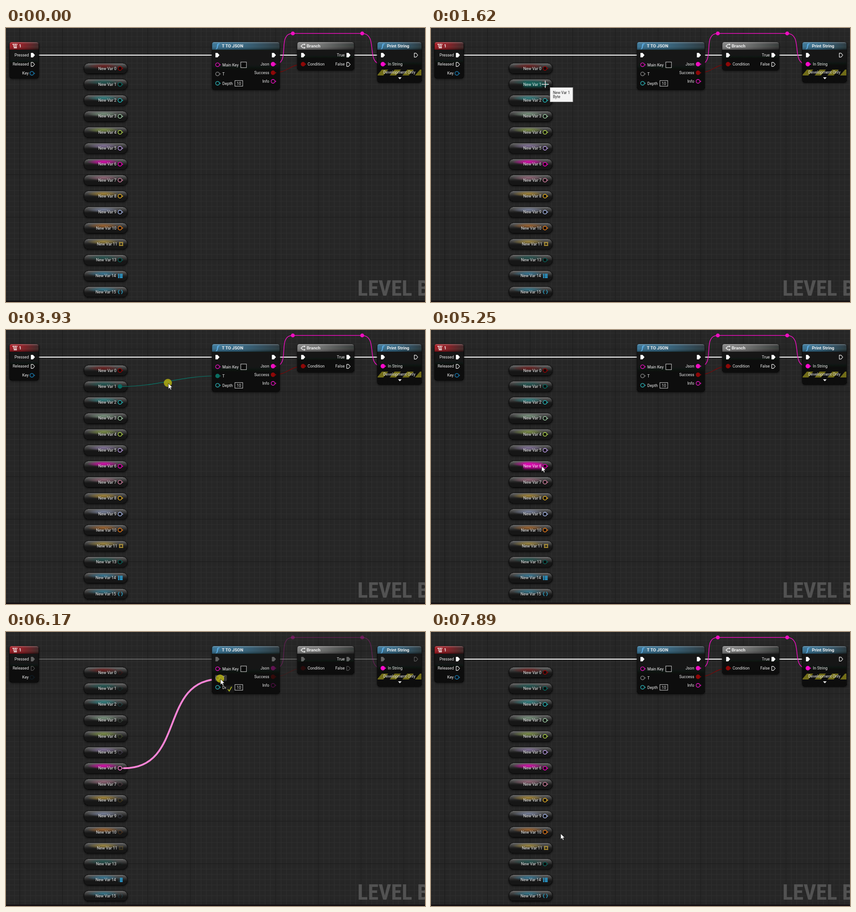
Write an HTML page that moves like this. It is 924 px wide and 606 px high and loops after 7990 ms.

```html
<!DOCTYPE html>
<html lang="en">
<head>
<meta charset="utf-8">
<title>Node graph</title>
<style>
html, body { margin: 0; width: 100%; height: 100%; overflow: hidden; background: #262626; }
svg { display: block; width: 100vw; height: 100vh; }
text { font: 8.8px Roboto, "Noto Sans", sans-serif; fill: #eee; white-space: pre; }
.title { font-weight: 700; font-size: 9.6px; }
.fn { font: italic 700 13px "Noto Serif", serif; fill: #62b4ee; }
.mark { font: 700 48px "Roboto Condensed", Roboto, sans-serif; font-stretch: 75%; fill: #525252; }
.tip { font-size: 8.2px; fill: #222; }
</style>
</head>
<body>
<svg id="stage" viewBox="0 0 924 606" preserveAspectRatio="none">
  <defs>
    <pattern id="minor" x="30" y="41.7" width="11.757" height="11.757" patternUnits="userSpaceOnUse">
      <path d="M.5 0V11.757M0 .5H11.757" stroke="#303030" stroke-width=".9"/>
    </pattern>
    <pattern id="major" x="30" y="41.7" width="94.056" height="94.056" patternUnits="userSpaceOnUse">
      <path d="M.5 0V94.056M0 .5H94.056" stroke="#191919"/>
    </pattern>
    <pattern id="stripes" width="28" height="13" x="818" y="92" patternUnits="userSpaceOnUse">
      <path d="M0 13L11 0H25L14 13Z" fill="#716c18"/>
    </pattern>
    <linearGradient id="body" x2="0" y2="1">
      <stop stop-color="#1b1d1c" stop-opacity=".95"/><stop offset="1" stop-color="#0a0a0a" stop-opacity=".95"/>
    </linearGradient>
    <linearGradient id="gloss" x2="0" y2="1">
      <stop stop-color="#fff" stop-opacity=".22"/><stop offset=".35" stop-color="#fff" stop-opacity=".05"/>
      <stop offset="1" stop-color="#000" stop-opacity=".3"/>
    </linearGradient>
    <linearGradient id="pill" x2="0" y2="1">
      <stop stop-color="#777"/><stop offset=".13" stop-color="#555"/>
      <stop offset=".42" stop-color="#2c2c2c"/><stop offset=".55" stop-color="#1a1a1a"/><stop offset="1" stop-color="#141414"/>
    </linearGradient>
    <filter id="shadow" x="-20%" y="-30%" width="140%" height="170%">
      <feDropShadow dx="0" dy="1.5" stdDeviation="2" flood-opacity=".75"/>
    </filter>
    <filter id="soft" x="-30%" y="-60%" width="160%" height="220%"><feGaussianBlur stdDeviation="2"/></filter>
  </defs>
  <rect width="924" height="606" fill="#262626"/>
  <rect width="924" height="606" fill="url(#minor)"/>
  <rect width="924" height="606" fill="url(#major)"/>
  <text class="mark" x="775" y="592">LEVEL B</text>
  <rect y="603" width="924" height="3" fill="#140f12"/>
</svg>
<script>
const LOOP = 7990;
const stage = document.getElementById('stage');
const defs = stage.querySelector('defs');

function el(parent, tag, attrs = {}, text) {
  const node = document.createElementNS('http://www.w3.org/2000/svg', tag);
  for (const key in attrs) node.setAttribute(key, attrs[key]);
  if (text !== undefined) node.textContent = text;
  parent.append(node);
  return node;
}
const group = (parent, attrs) => el(parent, 'g', attrs);
const label = (parent, x, y, text, anchor = 'start', cls = '') =>
  el(parent, 'text', { x, y, 'text-anchor': anchor, class: cls }, text);
const show = (node, on) => node.setAttribute('opacity', +on);

const varLayer = group(stage), wireLayer = group(stage), nodeLayer = group(stage), topLayer = group(stage);

// parts that fade while a wire is dragged: [element, faded opacity]
const fading = [];
function dims(node, low) { fading.push([node, low]); return node; }

function pin(parent, x, y, color, filled) {
  const g = group(parent, { transform: `translate(${x} ${y})` });
  g.ring = el(g, 'circle', { r: 4.1, stroke: color, 'stroke-width': 1.6, fill: filled ? color : '#0b0b0b' });
  g.tip = el(g, 'path', { d: 'M5.2 -1.9L7.3 0L5.2 1.9Z', fill: color });
  return g;
}
function paintPin(p, color, filled) {
  p.ring.setAttribute('stroke', color);
  p.ring.setAttribute('fill', filled ? color : '#0b0b0b');
  p.tip.setAttribute('fill', color);
}
function exec(parent, x, y, filled) {
  dims(el(parent, 'path', {
    d: `M${x - 3.6} ${y - 4.4}h3.8l4 4.4l-4 4.4h-3.8z`, fill: filled ? '#fff' : 'none',
    stroke: '#fff', 'stroke-width': 1.1, 'stroke-linejoin': 'round'
  }), .33);
}

// horizontal tangents that grow with both distances
function curve(x0, y0, x1, y1) {
  const c = (Math.abs(x1 - x0) + Math.abs(y1 - y0)) / 3;
  return `M${x0} ${y0}C${x0 + c} ${y0} ${x1 - c} ${y1} ${x1} ${y1}`;
}
const wire = (d, stroke, width) =>
  el(wireLayer, 'path', { d, stroke, 'stroke-width': width, fill: 'none', 'stroke-linecap': 'round' });

// variables
const vars = [
  [0, '#8e0505'], [1, '#0a6a62'], [2, '#25b3b5'], [3, '#a4d2ab'], [4, '#a9cc4b'],
  [5, '#b496dc'], [6, '#f500c0'], [7, '#cf7f9f'], [8, '#efb82a'], [9, '#a3b3e2'],
  [10, '#e27a1c'], [11, '#e5bd3c'], [13, '#0a5f57'], [14, '#2c9fd3'], [15, '#2a9fc4']
];
const pinAt = {}, glow = {};
vars.forEach(([n, color], i) => {
  const y = 89.5 + i * 35.3;
  const g = group(varLayer, { transform: `translate(0 ${y.toFixed(1)})` });
  const grad = el(defs, 'radialGradient', { id: 'tint' + n });
  const tint = n === 6 ? .85 : .55;
  [[0, tint], [.5, tint * .55], [1, 0]].forEach(([offset, o]) =>
    el(grad, 'stop', { offset, 'stop-color': color, 'stop-opacity': o }));
  el(g, 'rect', { x: 172, y: -11.5, width: 95.5, height: 23, rx: 9.5, fill: 'url(#pill)', stroke: '#090909', filter: 'url(#shadow)' });
  el(g, 'path', { d: 'M181 -10.6H258', stroke: '#b5b5b5', 'stroke-width': .8, opacity: .4 });
  el(g, 'ellipse', { cx: 215, cy: -5, rx: 36, ry: 6.2, fill: `url(#tint${n})` });
  glow[n] = el(g, 'rect', { x: 204, y: -6, width: 42, height: 12, fill: color, filter: 'url(#soft)', opacity: 0 });
  const icon = n === 11 || n > 13;
  label(g, icon ? (n === 11 ? 245.5 : 242.5) : 243.5, 3, 'New Var ' + n, 'end');
  if (n === 11) {
    const cells = dims(group(g, { fill: color }), .25);
    for (let k = 0; k < 9; k++)
      if (k !== 4) el(cells, 'rect', { x: 249.5 + k % 3 * 3.2, y: -4.5 + (k / 3 | 0) * 3.2, width: 2.3, height: 2.3 });
  } else if (n === 14) {
    const keys = dims(group(g, { fill: color }), .15);
    for (let k = 0; k < 3; k++) {
      el(keys, 'rect', { x: 247, y: -4.8 + k * 3.4, width: 3, height: 2.7 });
      el(g, 'rect', { x: 251, y: -4.8 + k * 3.4, width: 6.3, height: 2.7, fill: color });
    }
  } else if (n === 15) {
    dims(el(g, 'path', {
      d: 'M250.5 -4h-1q-1 0 -1 1.2v1.6l-1.4 1.2l1.4 1.2v1.6q0 1.2 1 1.2h1M253.8 -4h1q1 0 1 1.2v1.6l1.4 1.2l-1.4 1.2v1.6q0 1.2 -1 1.2h-1',
      fill: 'none', stroke: color, 'stroke-width': 1.3
    }), .2);
  } else {
    pinAt[n] = pin(g, 251.3, 0, color);
    pinAt[n].color = color;
    if (n !== 1 && n !== 6) dims(pinAt[n], n === 13 ? .08 : .2);
  }
});

// fixed wires
[[64, 466], [596, 655], [760, 831]].forEach(([a, b]) => dims(wire(`M${a} 60H${b}`, '#fff', 2.2), .28));
const pink = '#ee0fc0';
dims(wire(curve(593, 80, 632, 12) + 'H785' + curve(785, 12, 829, 80).replace('M', 'L'), pink, 1.5), .27);
dims(wire(curve(592, 99, 655, 80), '#780707', 1.4), .3);
for (const cx of [632.5, 785.5]) dims(el(wireLayer, 'circle', { cx, cy: 12, r: 4.3, fill: pink }), .3);
const dragWire = wire('', '#fff', 4);
const linkWire = wire('', '#fff', 1.4);

// function nodes
function box(x, w, h, color, title, titleX) {
  const g = group(nodeLayer), id = 'head' + x, d = `M${x} 48V36q0 -5 5 -5h${w - 10}q5 0 5 5v12z`;
  const grad = el(defs, 'linearGradient', { id });
  [[0, .95], [.4, .8], [1, .18]].forEach(([offset, o]) => el(grad, 'stop', { offset, 'stop-color': color, 'stop-opacity': o }));
  el(g, 'rect', { x, y: 31, width: w, height: h, rx: 5, fill: 'url(#body)', stroke: '#070707', filter: 'url(#shadow)' });
  el(g, 'path', { d, fill: `url(#${id})` });
  el(g, 'path', { d, fill: 'url(#gloss)' });
  el(g, 'path', { d: `M${x + 4} 31.5h${w - 8}`, stroke: '#ccc', 'stroke-width': .8, opacity: .3 });
  label(g, titleX, 43, title, 'start', 'title');
  return g;
}
const blue = '#317297';

const keyNode = box(8, 64, 80, '#a50f18', '1', 28.5);
[[14.5, 35, 3.2], [18.7, 35, 3.2], [22.9, 35, 2], [16.2, 38.6, 3.2], [20.4, 38.6, 3.2], [17, 42.2, 7]].forEach(([x, y, width]) =>
  el(keyNode, 'rect', { x, y, width, height: 2.5, fill: '#f2e8e8' }));
label(keyNode, 50.5, 63, 'Pressed', 'end');
label(keyNode, 50.5, 83.3, 'Released', 'end');
label(keyNode, 50, 103.3, 'Key', 'end');
exec(keyNode, 59, 60, true);
exec(keyNode, 59, 80.5, false);
dims(pin(keyNode, 57, 100.3, '#1b76a8'), .15);

const json = box(454.5, 149, 105, blue, 'T TO JSON', 476);
label(json, 464, 44, 'f', 'start', 'fn');
exec(json, 466, 60, true);
exec(json, 590.5, 60, true);
pin(json, 466.5, 81.3, '#d513b2');
const hoverT = el(json, 'rect', { x: 461, y: 95, width: 26, height: 13.5, rx: 2, fill: '#363636', opacity: 0 });
const pinT = pin(json, 466.5, 101.6, '#7c7c7c');
pin(json, 466.5, 122.3, '#2ba3a8');
label(json, 477, 84.5, 'Main Key');
label(json, 477, 104.8, 'T');
label(json, 477, 125.5, 'Depth');
el(json, 'rect', { x: 517.8, y: 75.3, width: 12.4, height: 12.4, fill: '#080808', stroke: '#ddd' });
el(json, 'rect', { x: 504.8, y: 116.3, width: 17.2, height: 12.4, fill: '#080808', stroke: '#ddd' });
label(json, 513.4, 125.7, '10', 'middle');
label(json, 580.5, 83, 'Json', 'end');
label(json, 580.5, 102.2, 'Success', 'end');
label(json, 580.5, 121.2, 'Info', 'end');
dims(pin(json, 588.8, 80, pink, true), .35);
dims(pin(json, 588.8, 99, '#8e0808', true), .3);
dims(pin(json, 588.8, 118, '#d513b2'), .3);

const branch = box(642.5, 125, 62, '#808080', 'Branch', 663);
el(branch, 'path', {
  d: 'M658.5 36.2H656q-3.8 0 -3.8 3.8t3.8 3.8h2.5M649.5 40h2.6', stroke: '#eee', 'stroke-width': 1.4, fill: 'none'
});
el(branch, 'path', { d: 'M657.5 34l3 2.2l-3 2.2zM657.5 41.6l3 2.2l-3 2.2z', fill: '#eee' });
exec(branch, 655, 60, true);
exec(branch, 755, 60, true);
exec(branch, 755, 80.5, false);
dims(pin(branch, 655, 80, '#8e0808', true), .22);
label(branch, 665, 83, 'Condition');
label(branch, 747, 63, 'True', 'end');
label(branch, 747, 83.3, 'False', 'end');

const print = box(819, 97.5, 89, blue, 'Print String', 840);
label(print, 828, 44, 'f', 'start', 'fn');
exec(print, 831, 60, true);
exec(print, 904, 60, false);
pin(print, 831, 80, '#fa0acb', true);
label(print, 842, 83, 'In String');
el(print, 'rect', { x: 819.5, y: 92, width: 96.5, height: 13, fill: 'url(#stripes)' });
label(print, 867.5, 101.3, 'Development Only', 'middle');
el(print, 'path', { d: 'M864.5 109h8l-4 4.6z', fill: '#e5e5e5' });

// pointer and hints
const tooltip = group(topLayer);
el(tooltip, 'rect', { x: 262.5, y: 131.5, width: 50.5, height: 32, fill: '#f4f4f4', stroke: '#777' });
label(tooltip, 269, 145.6, 'New Var 1', 'start', 'tip');
label(tooltip, 269, 155.3, 'Byte', 'start', 'tip');

const pointer = group(topLayer);
const press = el(pointer, 'circle', { cx: -1, cy: -1, r: 9, fill: '#bdb80f', 'fill-opacity': .78 });
const check = group(pointer);
el(check, 'rect', { x: 12, y: 13.5, width: 17.5, height: 17, rx: 1.5, fill: '#171717', 'fill-opacity': .95 });
el(check, 'path', { d: 'M16 22.5l3.3 4l5.4 -9.5', stroke: '#a5ae1d', 'stroke-width': 1.9, fill: 'none' });
const arrow = el(pointer, 'path', {
  d: 'M0 0V12.6L3 9.9L5 14.4L7.1 13.5L5.2 9.1H9.2Z', fill: '#fff', stroke: '#111', 'stroke-width': .8
});
const cross = el(pointer, 'path', { d: 'M-8 0H8M0 -8V8', stroke: '#fff', 'stroke-width': 1.4 });

// pointer track: time, x, y
const track = [
  [100, 827, 557], [800, 350, 166], [900, 349, 165], [1420, 252, 124.5], [1740, 252, 124.5],
  [2120, 445, 84], [2320, 447, 84], [2520, 468, 98], [2750, 468, 98], [3430, 356, 117],
  [3630, 356, 117], [3730, 358, 118], [4350, 358, 118], [5050, 248, 285], [5250, 244, 301],
  [5420, 251, 301], [5580, 251, 301], [5870, 446, 106], [5970, 449, 105], [6170, 473, 104],
  [6400, 473, 104], [6870, 366, 201], [7390, 366, 201], [7590, 320, 273], [7690, 320, 273], [7890, 286, 446]
];
function place(t) {
  let i = 0;
  while (i < track.length - 2 && t > track[i + 1][0]) i++;
  const [t0, x0, y0] = track[i], [t1, x1, y1] = track[i + 1];
  const k = Math.min(1, Math.max(0, (t - t0) / (t1 - t0))), s = k * k * (3 - 2 * k);
  return [x0 + (x1 - x0) * s, y0 + (y1 - y0) * s];
}

const drags = [
  { from: 1740, to: 2830, cut: 4350, over: 2480, n: 1, y: 124.8, light: '#8eaaa0', color: '#0b6d61' },
  { from: 5580, to: 6470, cut: 7370, over: 6120, n: 6, y: 301.3, light: '#ff85d8', color: '#f50fc4' }
];
const presses = [[1740, 2700], [3930, 4200], [5580, 6370], [7270, 7450]];
const within = (t, a, b) => t >= a && t < b;

function render(t) {
  const [x, y] = place(t);
  pointer.setAttribute('transform', `translate(${x.toFixed(2)} ${y.toFixed(2)})`);
  show(pointer, t >= 100);
  const drag = drags.find(d => within(t, d.from, d.to));
  const link = drags.find(d => within(t, d.to, d.cut));
  const aiming = within(t, 1350, 1740) || within(t, 5400, 5580);
  const onT = drag && t >= drag.over;
  show(cross, aiming);
  show(arrow, !aiming);
  show(press, presses.some(([a, b]) => within(t, a, b)));
  show(check, !!onT);
  show(hoverT, !!onT);
  show(tooltip, within(t, 1600, 1740));
  glow[1].setAttribute('opacity', within(t, 1150, 1740) ? .75 : 0);
  glow[6].setAttribute('opacity', within(t, 5080, 5580) ? .75 : 0);

  const fade = drag ? Math.min(1, (t - drag.from) / 120) : 0;
  for (const [node, low] of fading) node.setAttribute('opacity', 1 - (1 - low) * fade);
  for (const d of drags) {
    const p = pinAt[d.n];
    p.setAttribute('opacity', drag && drag !== d ? 1 - .8 * fade : 1);
    paintPin(p, d === drag && d.n === 6 ? d.light : p.color, d === link);
  }
  paintPin(pinT, link ? link.color : '#7c7c7c', !!link);

  show(dragWire, !!drag);
  if (drag) {
    dragWire.setAttribute('d', curve(260, drag.y, x, y));
    dragWire.setAttribute('stroke', drag.light);
  }
  show(linkWire, !!link);
  if (link) {
    linkWire.setAttribute('d', curve(258, link.y, 462, 101.6));
    linkWire.setAttribute('stroke', link.color);
  }
}

const start = performance.now();
function frame() {
  render((performance.now() - start) % LOOP);
  requestAnimationFrame(frame);
}
render(0);
requestAnimationFrame(frame);
</script>
</body>
</html>
```
